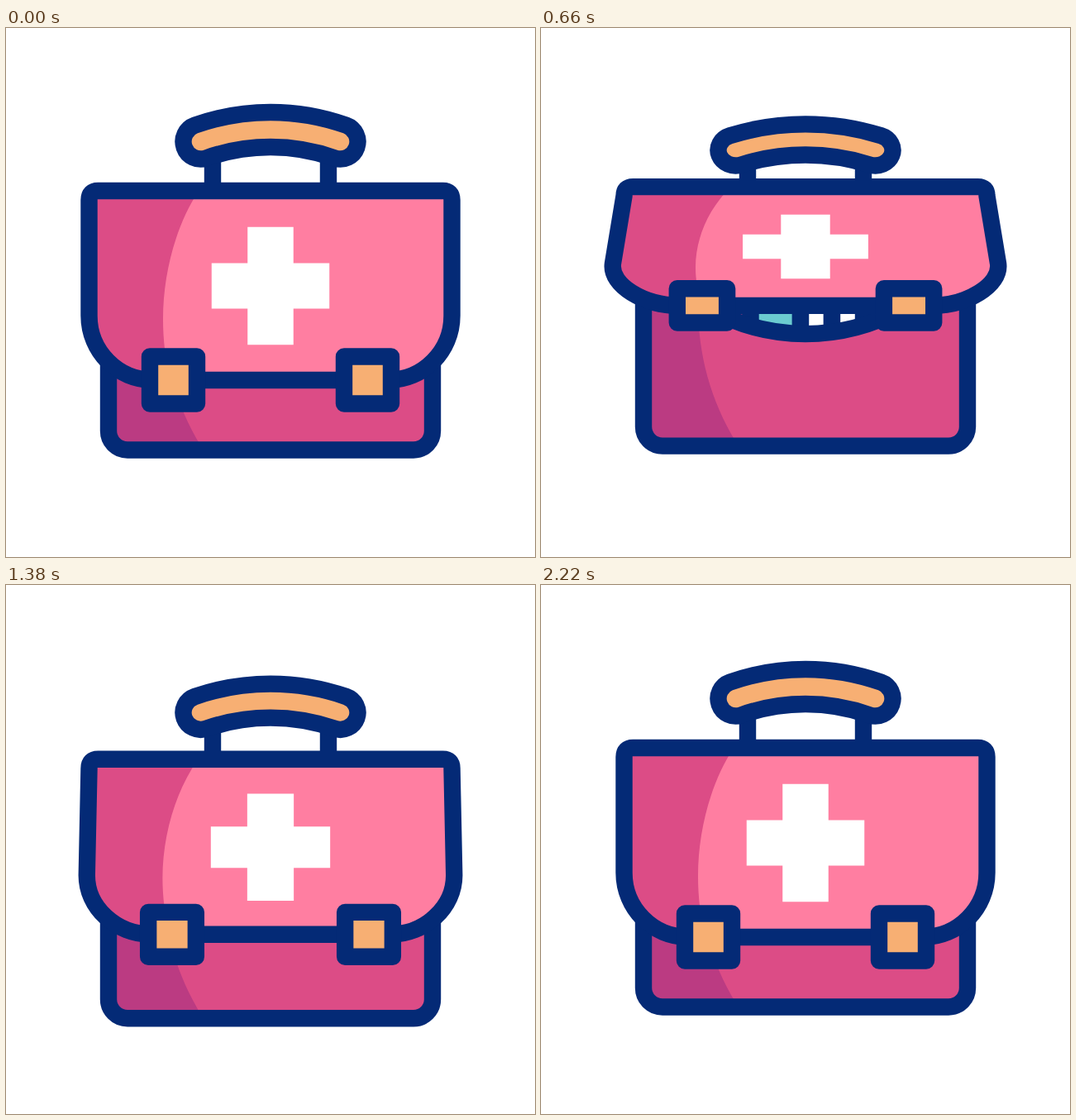
Recreate the animation shown at these times as an HTML page. Size 640 by 640 pixels, loop 2.32 s.

```html
<!DOCTYPE html>
<html lang="en">
<head>
<meta charset="utf-8">
<title>First aid bag</title>
<style>
  html, body { margin: 0; width: 100%; height: 100%; overflow: hidden; background: #fff; }
  svg { display: block; width: 100%; height: 100%; }
  .line { stroke: #042a76; stroke-width: 20.4; stroke-linejoin: round; }
  .none { fill: none; }
  .pink { fill: #ff7ea1; }
  .rose { fill: #dc4c86; }
  .plum { fill: #bb3b82; }
  .sand { fill: #f7af73; }
  .teal { fill: #6bcbd0; }
  .white { fill: #fff; }
</style>
</head>
<body>
<svg viewBox="0 0 640 640">
  <defs>
    <clipPath id="frontClip"><path id="frontShape" d="M124 273.5A240 240 0 0 0 516 273.5V487.5a23 23 0 0 1-23 23H147a23 23 0 0 1-23-23Z"/></clipPath>
    <clipPath id="flapClip"><path id="flapShape"/></clipPath>
    <path id="stick" d="M314 400V324a19 19 0 0 1 38 0V400Z"/>
  </defs>
  <g id="bag">
    <path class="plum" d="M124 230H516V400H124Z"/>
    <path class="line teal" d="M253.5 400V347q0-23 23-23H314V400Z"/>
    <use href="#stick" class="line white"/>
    <use href="#stick" class="line white" x="38"/>
    <use href="#frontShape" class="rose"/>
    <path class="plum" clip-path="url(#frontClip)" d="M120 260H190V340C190 400 205 455 236 506V520H120Z"/>
    <path class="line none" d="M124 273.5A240 240 0 0 0 516 273.5"/>
    <path class="line none" d="M124 230V487.5a23 23 0 0 0 23 23H493a23 23 0 0 0 23-23V230"/>
    <path class="line none" id="posts"/>
    <path class="line sand" id="handle"/>
    <use href="#flapShape" class="pink"/>
    <g clip-path="url(#flapClip)">
      <path class="rose" id="flapShade" d="M40 197H233C205 240 190 298 190 352C190 378 193 400 198 426V450H40Z"/>
    </g>
    <path class="white" id="cross"/>
    <use href="#flapShape" class="line none"/>
    <path class="line sand" id="buckles"/>
  </g>
</svg>
<script>
const LOOP = 2320;
const TOP = 197, FLAP = 229, TRAVEL = 141;
const $ = id => document.getElementById(id);
const mix = (a, b, k) => a + (b - a) * k;

const smooth = u => u * u * (3 - 2 * u);
const springUp = u => smooth(1 - (1 - u) ** 1.55);
const fallShut = u => smooth(u ** 1.4);

// Each pose is reached at time `at`; lift moves the bag, open turns the flap
const poses = [
  { at: 200, lift: 0, open: 0 },
  { at: 430, lift: 26, open: -.073 },
  { at: 960, lift: -23, open: 1, ease: springUp },
  { at: 1160, lift: -27, open: 1.087 },
  { at: 1430, lift: 21, open: -.05, ease: fallShut },
  { at: 1681, lift: -31, open: .62 },
  { at: 1891, lift: 7, open: -.04 },
  { at: 2220, lift: 0, open: 0 }
];

function poseAt(t) {
  const i = poses.findIndex(p => p.at > t);
  if (i < 1) return poses[0];
  const from = poses[i - 1], to = poses[i];
  const k = (to.ease || smooth)((t - from.at) / (to.at - from.at));
  return { lift: mix(from.lift, to.lift, k), open: mix(from.open, to.open, k) };
}

function flapPath(open, drop) {
  const point = (x0, y0, x1, y1) => [mix(x0, x1, open), mix(y0, y1, open) + drop];
  const left = [
    point(100.5, 348, 78, 252),
    point(100.5, 391, 72, 267),
    point(135, 426, 118, 285),
    point(178, 426, 160, 285)
  ];
  const right = left.map(([x, y]) => [640 - x, y]);
  const [a, b, c, d] = left, [e, f, g, h] = right;
  return `M111.5 197Q100.5 197 100.5 208L${a}C${b} ${c} ${d}L${h}C${g} ${f} ${e}L539.5 208Q539.5 197 528.5 197Z`;
}

// A bent bar with round ends, squashed by k from its top edge
function handlePath(k, dy) {
  const y = v => 102 + (v - 102) * k + dy;
  const arc = (r, sweep, x, v) => `A${r} ${r * k} 0 0 ${sweep} ${x} ${y(v)}`;
  return `M228.5 ${y(117.7)}` + arc(274, 1, 411.5, 117.7) + arc(21, 1, 397.5, 157.3) +
    arc(232, 0, 242.5, 157.3) + arc(21, 1, 228.5, 117.7) + 'Z';
}

const box = (cx, cy, w, h) => `M${cx - w / 2} ${cy - h / 2}h${w}v${h}h${-w}Z`;

function draw(t) {
  const { lift, open: swing } = poseAt(t);
  const open = Math.max(0, swing);
  const drop = Math.max(0, -swing) * TRAVEL;
  const sink = 32 * swing - .2 * drop;

  $('bag').setAttribute('transform', `translate(0 ${lift})`);
  $('flapShape').setAttribute('d', flapPath(open, drop));
  $('flapShade').setAttribute('transform',
    `translate(${-5 * open} ${TOP}) scale(1 ${1 - swing * TRAVEL / FLAP}) translate(0 ${-TOP})`);

  const crossY = 312 - TRAVEL / 2 * open + drop;
  $('cross').setAttribute('d',
    box(320, crossY, mix(55.5, 62, open), mix(142.5, 35, open)) +
    box(320, crossY, mix(142.5, 158, open), mix(55, 13, open)));

  const buckleX = mix(202.5, 190, open), buckleY = 426 - TRAVEL * open + drop;
  const size = [mix(57, 62.5, open), mix(57, 31, open)];
  $('buckles').setAttribute('d',
    box(buckleX, buckleY, ...size) + box(640 - buckleX, buckleY, ...size));

  $('handle').setAttribute('d', handlePath(1 - .19 * open, sink));
  $('posts').setAttribute('d', `M250 ${150 + sink}V${TOP}M390 ${150 + sink}V${TOP}`);
}

const start = performance.now();
function tick() {
  draw((performance.now() - start) % LOOP);
  requestAnimationFrame(tick);
}
tick();
</script>
</body>
</html>
```
